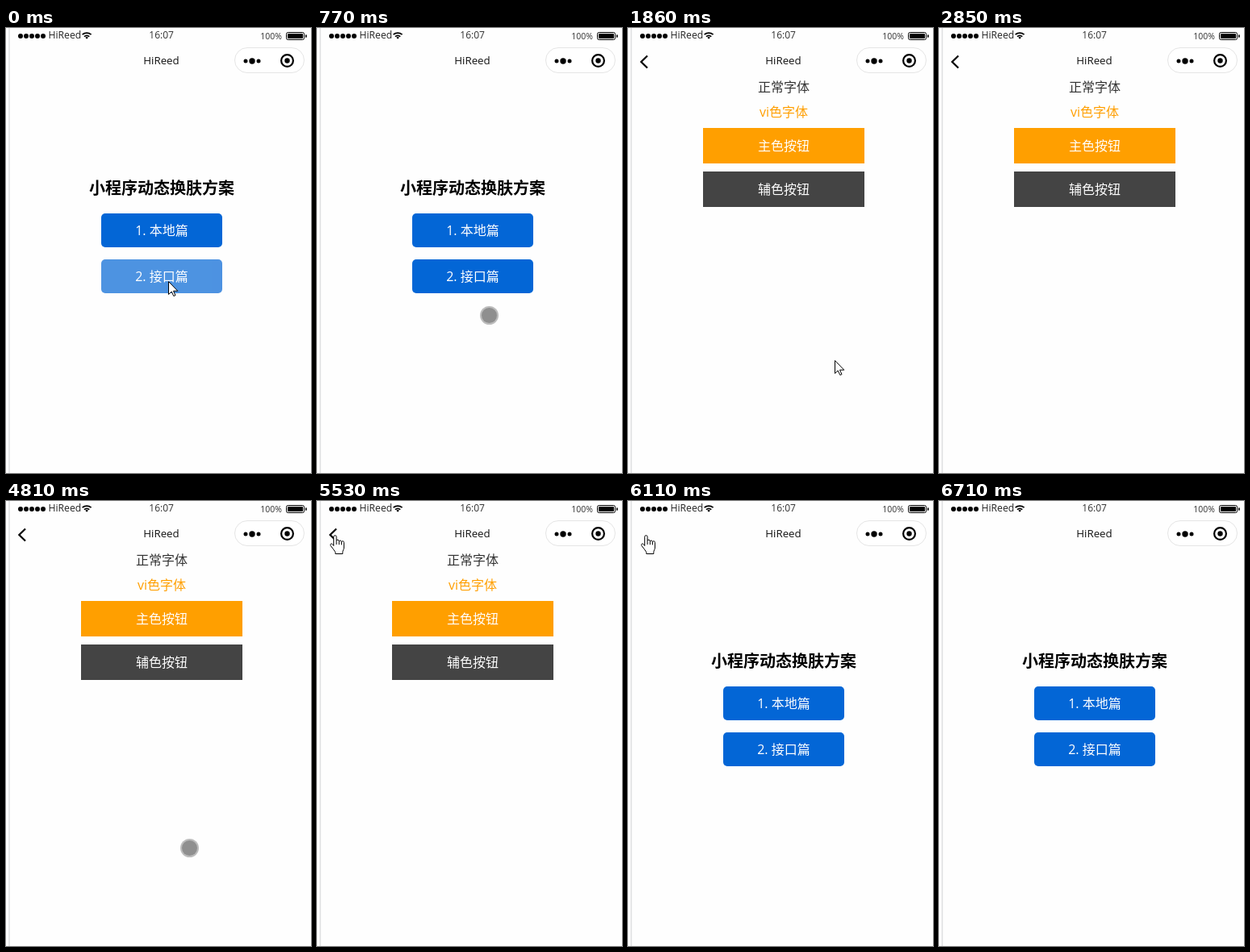
These frames come from a looping animation (378x552 px, 7.14 s). An HTML page:

```html
<!DOCTYPE html>
<html lang="zh-CN">
<head>
<meta charset="utf-8">
<title>小程序动态换肤方案</title>
<style>
html, body { margin: 0; height: 100%; overflow: hidden; background: #fefefe; }
svg { display: block; font-family: "Open Sans", "Noto Sans CJK SC", "Noto Sans CJK", sans-serif; }
.mid { text-anchor: middle; font-size: 16px; }
.light { fill: #fff; }
</style>
</head>
<body>
<svg width="378" height="552" viewBox="0 0 378 552">
  <rect width="378" height="552" fill="#fefefe"/>

  <g id="home">
    <text class="mid" x="193" y="206" style="font-size:20px;font-weight:700">小程序动态换肤方案</text>
    <rect x="118" y="230" width="150" height="42" rx="5" fill="#0366d6"/>
    <text class="mid light" x="193" y="257">1. 本地篇</text>
    <g id="second">
      <rect x="118" y="287" width="150" height="42" rx="5" fill="#0366d6"/>
      <text class="mid light" x="193" y="314">2. 接口篇</text>
    </g>
  </g>

  <g id="skin">
    <rect x="5" y="60" width="375" height="492" fill="#fefefe"/>
    <text class="mid" x="193" y="79" fill="#333">正常字体</text>
    <text class="mid" x="193" y="110" fill="#ff9f00">vi色字体</text>
    <rect x="93" y="124" width="200" height="44" fill="#ff9f00"/>
    <text class="mid light" x="193" y="152">主色按钮</text>
    <rect x="93" y="178" width="200" height="44" fill="#444"/>
    <text class="mid light" x="193" y="206">辅色按钮</text>
  </g>

  <path d="M4 0V552" stroke="#e6e7e8" stroke-width="2"/>

  <!-- status bar -->
  <path d="M18 10h28.1" stroke="#000" stroke-width="6" stroke-linecap="round" stroke-dasharray="0 7"/>
  <text x="52.5" y="13" font-size="12.2" fill="#222">HiReed</text>
  <g fill="none" stroke="#000" stroke-width="1.7">
    <path d="M94.6 8.2a8.2 8.2 0 0 1 11 0M96.9 10.6a5 5 0 0 1 6.4 0"/>
    <path d="M98.3 11.8a2.8 2.8 0 0 1 3.6 0l-1.8 2z" fill="#000" stroke="none"/>
  </g>
  <text x="177.3" y="13" font-size="12" fill="#333">16:07</text>
  <text x="315.3" y="14" font-size="10.5" fill="#333">100%</text>
  <rect x="347.5" y="5.5" width="22" height="9" rx="2" fill="none" stroke="#000"/>
  <rect x="349" y="7" width="19" height="6" rx=".8"/>
  <rect x="371" y="8.3" width="1.7" height="3.6" rx=".8"/>

  <!-- navigation bar -->
  <path id="back" d="M24 34.5L16.3 42L24 49.5" fill="none" stroke="#000" stroke-width="2.2"/>
  <text class="mid" x="192.5" y="45" style="font-size:13.3px" fill="#111">HiReed</text>
  <rect x="283.5" y="24.5" width="86" height="31" rx="15.5" fill="#fff" stroke="#e5e5e5"/>
  <circle cx="297" cy="41" r="2.5"/>
  <circle cx="305" cy="41" r="3.7"/>
  <circle cx="313" cy="41" r="2.5"/>
  <circle cx="348.5" cy="40.5" r="7.4" fill="none" stroke="#000" stroke-width="2.2"/>
  <circle cx="348.5" cy="40.5" r="3.2"/>

  <!-- pointers, drawn from their own top left or centre -->
  <path id="arrow" d="M.5 .5V16.5L4.2 13L6.8 18.5L9 17.6L6.5 12.2H11.8Z" fill="#fff" stroke="#000"/>
  <g id="touch">
    <circle r="11.5" fill="#bcbcbc"/>
    <circle r="9.5" fill="#8f8f8f"/>
  </g>
  <g id="hand" fill="#fff" stroke="#000" stroke-linejoin="round">
    <path d="M4.7 13.5V2.4a1.7 1.7 0 0 1 3.4 0V7a1.7 1.7 0 0 1 3.2 .8a1.7 1.7 0 0 1 3.1 .8a1.6 1.6 0 0 1 3 .8V16c0 2.2-1.6 3.5-1.6 5.5v2H6.8v-2C5.3 18.5 2.6 16 1 13.6c-1.3-2.2 .9-3.4 2.2-2z"/>
    <path d="M8.1 7v5M11.3 7.8v4.4M14.4 8.6v3.8" fill="none"/>
  </g>
</svg>
<script>
const LOOP = 7140, OFF = 375;
const $ = id => document.getElementById(id);

// [start ms, pointer kind, x, y]
const pointer = [
  [0, 'arrow', 201, 314],
  [250, 'touch', 201.5, 314.5],
  [650, 'touch', 209.5, 341.5],
  [770, 'touch', 213.5, 356.5],
  [920, 'touch', 213.5, 357.5],
  [1200, 'touch', 213.5, 358.5],
  [1350, 'touch', 236.5, 387.5],
  [1470, 'touch', 256.5, 412.5],
  [1620, 'arrow', 256, 412],
  [2730, 'touch', 304.5, 519.5],
  [2850, 'none'],
  [4810, 'touch', 227.5, 430.5],
  [4960, 'touch', 106.5, 232.5],
  [5080, 'arrow', 11, 67],
  [5230, 'arrow', 11, 45],
  [5380, 'arrow', 15, 42],
  [5530, 'hand', 16, 42],
  [6230, 'arrow', 42, 70],
  [6350, 'touch', 130.5, 214.5],
  [6470, 'touch', 248.5, 398.5],
  [6590, 'touch', 321.5, 504.5],
  [6710, 'none']
];
// [start ms, horizontal offset of the second page]
const slide = [[0, OFF], [1620, 281.4], [1740, 94], [1860, 0], [5830, 125], [5960, OFF]];

const at = (steps, t) => steps.findLast(s => s[0] <= t);
const show = (el, on) => el.setAttribute('visibility', on ? 'visible' : 'hidden');

function draw(t) {
  const [, kind, x, y] = at(pointer, t);
  for (const id of ['arrow', 'touch', 'hand']) {
    show($(id), id === kind);
    if (id === kind) $(id).setAttribute('transform', `translate(${x} ${y})`);
  }
  const dx = at(slide, t)[1];
  $('skin').setAttribute('transform', `translate(${dx} 0)`);
  show($('skin'), dx < OFF);
  show($('home'), dx > 0);
  $('second').setAttribute('opacity', t < 770 ? .7 : 1);
  show($('back'), t >= 1620 && t < 6110);
}

function tick() {
  draw(performance.now() % LOOP);
  requestAnimationFrame(tick);
}
tick();
</script>
</body>
</html>
```
